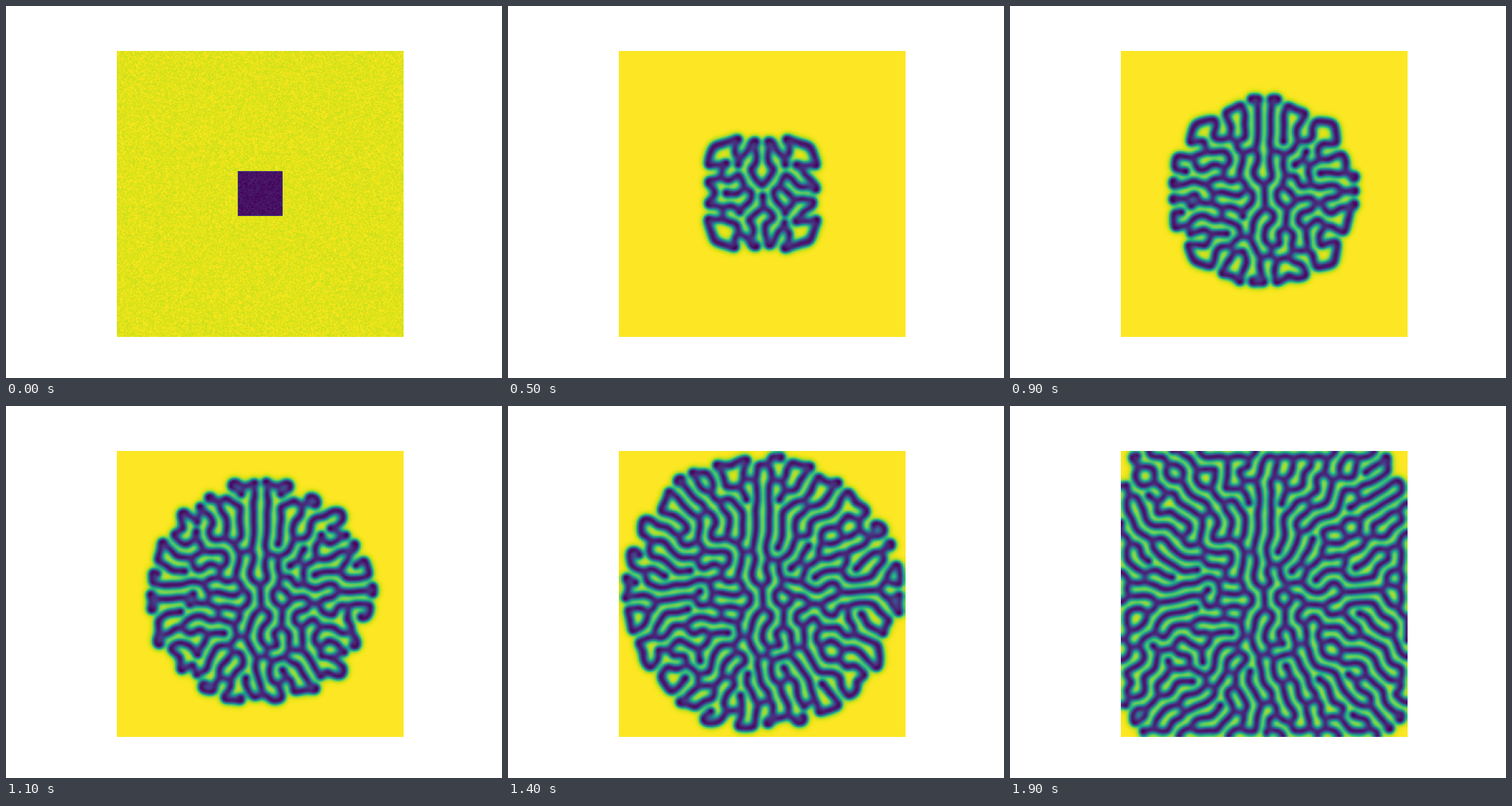
A matplotlib script that plays this animation: 640x480 px, repeating every 2000 ms.

```python
import numpy as np
import matplotlib.pyplot as plt
from matplotlib.animation import FuncAnimation

# Gray-Scott reaction-diffusion, coral regime
N, R = 256, 20
DU, DV, FEED, KILL = 0.16, 0.08, 0.060, 0.062
FRAMES, INTERVAL = 20, 100
STRIDE = 50                        # steps between stored states
REF_FRAME, REF_REACH = 11, 106.0   # front radius in cells at that frame
MAX_REF_STEPS = 9000


def column(a, b):
    return np.array([a, b], dtype=np.float32).reshape(2, 1, 1)


def initial_state():
    rng = np.random.RandomState(0)
    z = np.zeros((2, N + 2, N + 2), dtype=np.float32)
    z[0] = 1.0
    box = slice(N // 2 - R + 1, N // 2 + R + 1)
    z[0, box, box] = 0.50
    z[1, box, box] = 0.25
    z[:, 1:-1, 1:-1] += 0.05 * rng.random_sample((2, N, N))
    return z


def reach(u):
    """Mean distance of the pattern's four sides from the centre."""
    dark = u < 0.5
    ext = 0.0
    for axis in (0, 1):
        idx = np.flatnonzero(dark.any(axis=axis))
        if idx.size:
            ext += idx[-1] - idx[0] + 1
    return ext / 4


def simulate():
    z = initial_state()
    core = z[:, 1:-1, 1:-1]
    u, v = core
    north, south = z[:, :-2, 1:-1], z[:, 2:, 1:-1]
    west, east = z[:, 1:-1, :-2], z[:, 1:-1, 2:]
    diff = column(DU, DV)
    keep = column(1 - 4 * DU - FEED, 1 - 4 * DV - FEED - KILL)
    source = column(FEED, 1e-15)   # tiny floor avoids slow denormals
    total = np.empty_like(core)
    uvv = np.empty_like(u)

    def step():
        z[:, 0], z[:, -1] = z[:, 1], z[:, -2]
        z[:, :, 0], z[:, :, -1] = z[:, :, 1], z[:, :, -2]
        np.add(north, south, out=total)
        np.add(total, west, out=total)
        np.add(total, east, out=total)
        np.multiply(total, diff, out=total)
        np.add(total, source, out=total)
        np.multiply(v, v, out=uvv)
        np.multiply(uvv, u, out=uvv)
        np.multiply(core, keep, out=core)
        np.add(core, total, out=core)
        np.subtract(u, uvv, out=u)
        np.add(v, uvv, out=v)

    history = [u.copy()]
    per_frame = None
    while True:
        for _ in range(STRIDE):
            step()
        history.append(u.copy())
        done = len(history) - 1
        if per_frame is None and (reach(u) >= REF_REACH
                                  or done * STRIDE >= MAX_REF_STEPS):
            per_frame = done / REF_FRAME
        if per_frame and done >= round(per_frame * (FRAMES - 1)):
            break
    return [history[round(i * per_frame)] for i in range(FRAMES)]


states = simulate()

fig, ax = plt.subplots(figsize=(6.4, 4.8), dpi=100)
ax.axis("off")
image = ax.imshow(states[0], cmap="viridis")


def update(i):
    image.set_data(states[i])
    image.set_clim(states[i].min(), states[i].max())
    return (image,)


anim = FuncAnimation(fig, update, frames=FRAMES, interval=INTERVAL,
                     repeat=True, repeat_delay=0)
plt.show()
```
